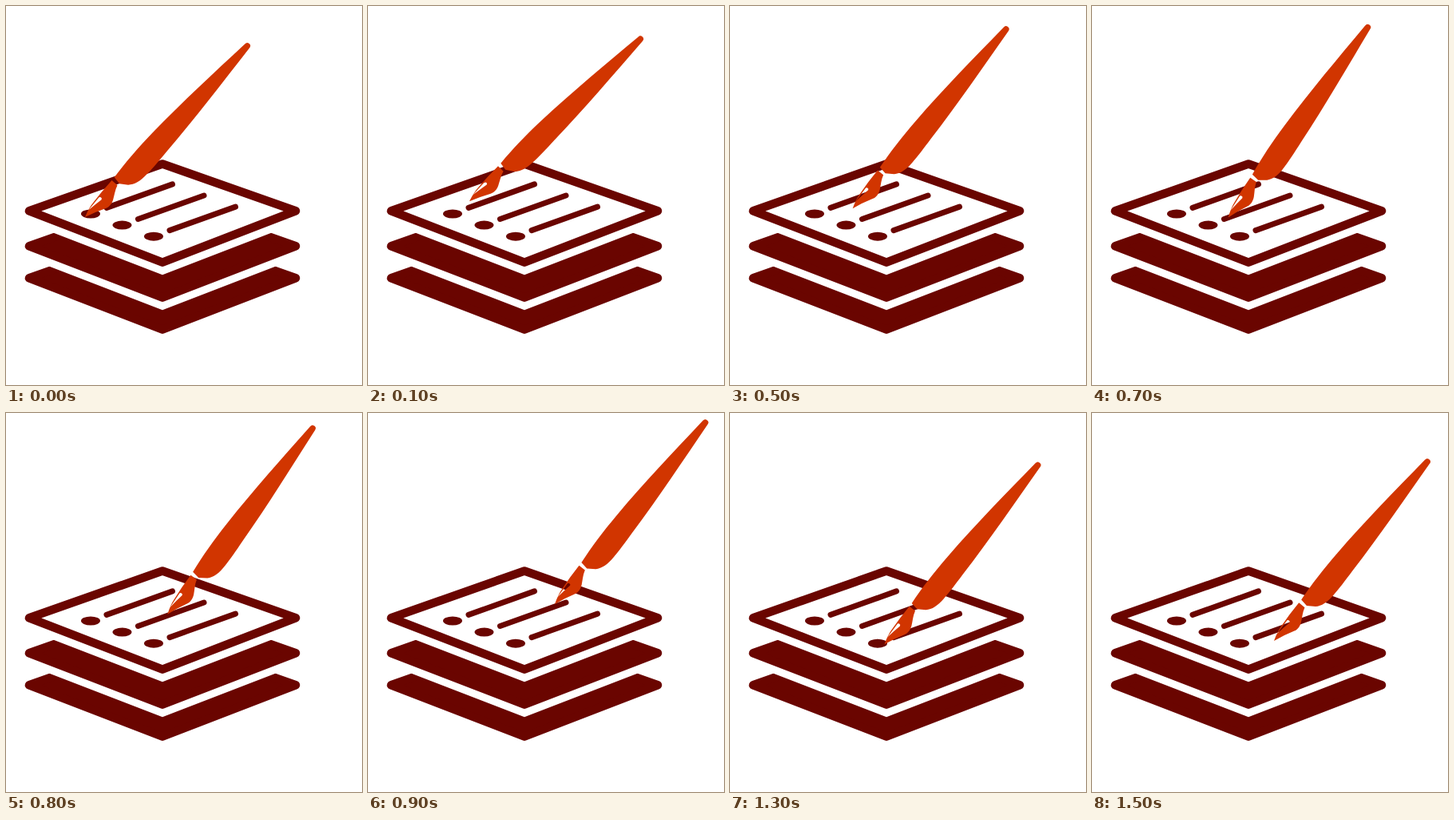
An HTML page that plays this animation: 446 px wide and 474 px high, repeating every 1700 ms.

```html
<!DOCTYPE html>
<html lang="en">
<head>
<meta charset="utf-8">
<title>Pen writing a list</title>
<style>
  html, body { margin: 0; width: 100%; height: 100%; overflow: hidden; background: #fff; }
  svg { display: block; width: 100vw; height: 100vh; }
  .gap { fill: #fff; stroke: #fff; stroke-width: 29; }
  .sheet { fill: #6a0500; stroke: #6a0500; stroke-width: 10.6; stroke-linejoin: round; }
  .sheet.top { fill: #fff; }
  .row { fill: #6a0500; stroke: #6a0500; stroke-linecap: round; }
  #pen { fill: #d13500; }
</style>
</head>
<body>
<svg viewBox="0 0 446 474">
  <g id="paper"></g>
  <!-- Pen lies along +x with its tip at the origin -->
  <g id="pen">
    <path d="M61.3 -7.5 C85 -10.3 108 -11.4 135 -11.2 C190 -10.8 240 -7.2 295 -3.8
             A3.8 3.8 0 0 1 295.3 3.8 C240 9 185 15 130 17.7 C115 18.7 103 19.5 92 19.3
             C80 19.3 72 17 66.5 11.5 L60 2.5 Z"/>
    <path fill-rule="evenodd"
          d="M0 0 Q12 -4.5 20 -5 Q38 -7 56.5 -7.3 L56.8 2
             C50 4 45 8 40 10.5 C35 13 30 13.3 26 11.3 Q13 4.5 0 0 Z
             M9 -2.9 L29 -4.2 A2.1 2.1 0 0 1 30 -.1 L20 -1.6 Z"/>
  </g>
</svg>
<script>
const STEP = 100, LOOP = 1700, LAST = 15;

// Each sheet hides the one below it, with a white gap around its edge
const diamond = 'M29 256.3 L196 197.5 L363 256.3 L196 320.6 Z';
const sheet = (dy, kind) =>
  `<path class="${kind}" transform="translate(0 ${dy})" d="${diamond}"/>`;
const row = i => `<g class="row" transform="translate(${39.5 * i} ${14.1 * i})">
  <ellipse cx="106" cy="260" rx="12" ry="5.5" stroke="none"/>
  <path stroke-width="7" d="M126 252.4 l82.5 -29.5"/></g>`;

document.getElementById('paper').innerHTML =
  sheet(84, 'sheet') +
  sheet(44, 'gap') + sheet(44, 'sheet') +
  sheet(0, 'gap') + sheet(0, 'sheet top') +
  [0, 1, 2].map(row).join('');

// The pen glides evenly between these poses
const poses = [
  { at: 0, x: 99, y: 264, tilt: 46.5 },
  { at: 3, x: 183, y: 205, tilt: 37.4 },
  { at: 6, x: 139, y: 277.3, tilt: 55.4 },
  { at: 9, x: 234, y: 239, tilt: 50.3 },
  { at: 12, x: 177, y: 286, tilt: 49.4 },
  { at: 13, x: 193.5, y: 289.3, tilt: 49.4 },
  { at: LAST, x: 228, y: 285, tilt: 49.4 }
];
const pen = document.getElementById('pen');

function draw(ms) {
  const step = Math.min(LAST, Math.floor((ms % LOOP) / STEP));
  const i = Math.max(1, poses.findIndex(p => p.at >= step));
  const a = poses[i - 1], b = poses[i];
  const k = (step - a.at) / (b.at - a.at);
  const mix = key => a[key] + (b[key] - a[key]) * k;
  pen.setAttribute('transform',
    `translate(${mix('x')} ${mix('y')}) rotate(${-mix('tilt')})`);
}

const start = performance.now();
function tick() {
  draw(performance.now() - start);
  requestAnimationFrame(tick);
}
tick();
</script>
</body>
</html>
```
